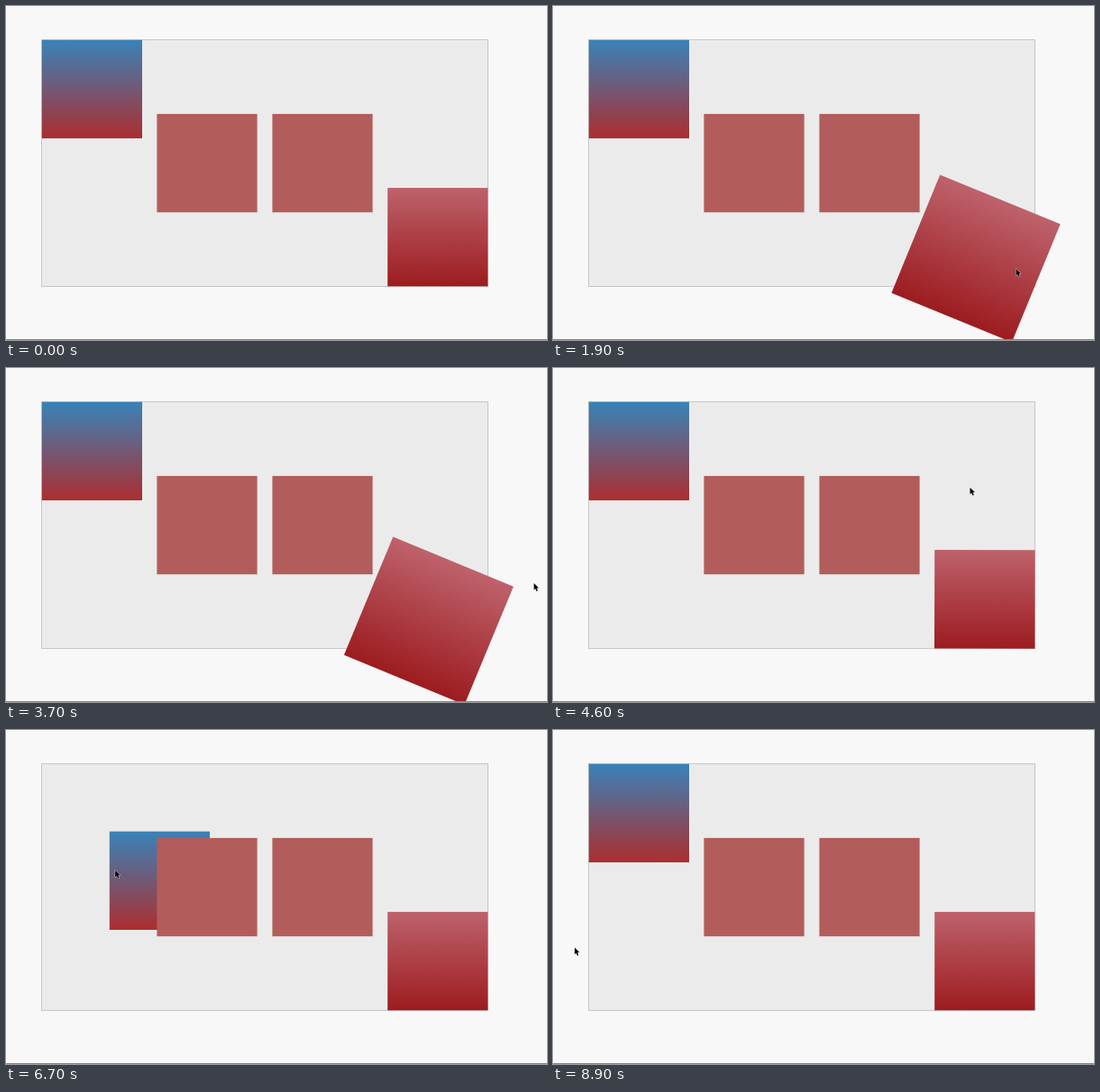
Write an HTML page with a canvas that moves like this. It is 600 px wide and 371 px high and loops after 9300 ms.

```html
<!DOCTYPE html>
<html lang="en">
<head>
<meta charset="utf-8">
<title>Hover transitions</title>
<style>
  html, body { margin: 0; width: 100%; height: 100%; overflow: hidden; background: #f8f8f8; }
  canvas { display: block; width: 100%; height: 100%; }
</style>
</head>
<body>
<canvas id="stage" width="600" height="371"></canvas>
<script>
const ctx = document.getElementById('stage').getContext('2d');
const LOOP = 9300, STEP = 100, LAST = 8900;
const W = 111.2, H = 109.3;

// Pointer glides: start time, end time, destination
const entry = { x: 583, y: 332 };
const glides = [
  [100, 1500, 513.5, 291.8],
  [1900, 2500, 530, 270],
  [3000, 3700, 585.5, 239],
  [3900, 4600, 462.5, 132.7],
  [4600, 5000, 274, 108],
  [5200, 5500, 125.5, 122.2],
  [6200, 7100, 118, 180],
  [7100, 7600, 27.5, 240.4],
  [8700, 8900, 24, 241.7]
];

const clamp = k => Math.max(0, Math.min(1, k));
const smooth = k => k * k * (3 - 2 * k);

function bezier(x1, y1, x2, y2) {
  const at = (a, b, u) => 3 * a * u * (1 - u) ** 2 + 3 * b * u * u * (1 - u) + u ** 3;
  return x => {
    let lo = 0, hi = 1;
    for (let i = 0; i < 24; i++) {
      const mid = (lo + hi) / 2;
      if (at(x1, x2, mid) < x) lo = mid; else hi = mid;
    }
    return at(y1, y2, lo);
  };
}
const ease = bezier(0.25, 0.1, 0.25, 1);
const easeInOut = bezier(0.42, 0, 0.58, 1);

// Hover progress: forward from `enter`, back from `leave`
const hover = (t, enter, leave, length, curve) =>
  curve(clamp((t - enter) / length)) - curve(clamp((t - leave) / length));

function pointerAt(t) {
  let { x, y } = entry;
  for (const [start, end, toX, toY] of glides) {
    const k = smooth(clamp((t - start) / (end - start)));
    x += (toX - x) * k;
    y += (toY - y) * k;
  }
  return { x, y };
}

function box(x, y, top, bottom = top) {
  const fill = ctx.createLinearGradient(0, y, 0, y + H);
  fill.addColorStop(0, top);
  fill.addColorStop(1, bottom);
  ctx.fillStyle = fill;
  ctx.fillRect(x, y, W, H);
}

function drawPanel() {
  ctx.fillStyle = '#f8f8f8';
  ctx.fillRect(0, 0, 600, 371);
  ctx.fillStyle = '#ebebeb';
  ctx.fillRect(39, 37, 496, 275);
  ctx.strokeStyle = '#c6c6c6';
  ctx.lineWidth = 1;
  ctx.strokeRect(39.5, 37.5, 495, 274);
}

function drawSpinner(p) {
  ctx.save();
  ctx.translate(478.8, 256.7);
  ctx.rotate(p * Math.PI / 8);
  ctx.scale(1 + 0.3 * p, 1 + 0.3 * p);
  ctx.translate(0, 20 * p);
  box(-W / 2, -H / 2, '#be626c', '#9c1c1f');
  ctx.restore();
}

function drawPointer({ x, y }) {
  ctx.save();
  ctx.translate(x, y);
  const shape = new Path2D('M0 0V7.6L1.7 6.1L3 9L4.3 8.4L3.1 5.6L5.4 5.4Z');
  ctx.lineJoin = 'round';
  ctx.lineWidth = 1;
  ctx.strokeStyle = 'rgba(255,255,255,0.8)';
  ctx.stroke(shape);
  ctx.fillStyle = '#000';
  ctx.fill(shape);
  ctx.restore();
}

function draw(t) {
  drawPanel();
  const shift = 75 * hover(t, 5365, 7190, 1250, easeInOut);
  box(39.8 + shift, 37.7 + shift, '#3883b9', '#ac2e2f');
  box(167.4, 119.9, '#b25d5b');
  box(295.4, 119.9, '#b25d5b');
  drawSpinner(hover(t, 1020, 3700, 1000, ease));
  ctx.fillStyle = '#858585';
  ctx.fillRect(0, 370, 600, 1);
  if (t >= glides[0][0]) drawPointer(pointerAt(t));
}

const start = performance.now();
function tick() {
  const t = (performance.now() - start) % LOOP;
  draw(Math.min(Math.floor(t / STEP) * STEP, LAST));
  requestAnimationFrame(tick);
}
tick();
</script>
</body>
</html>
```
